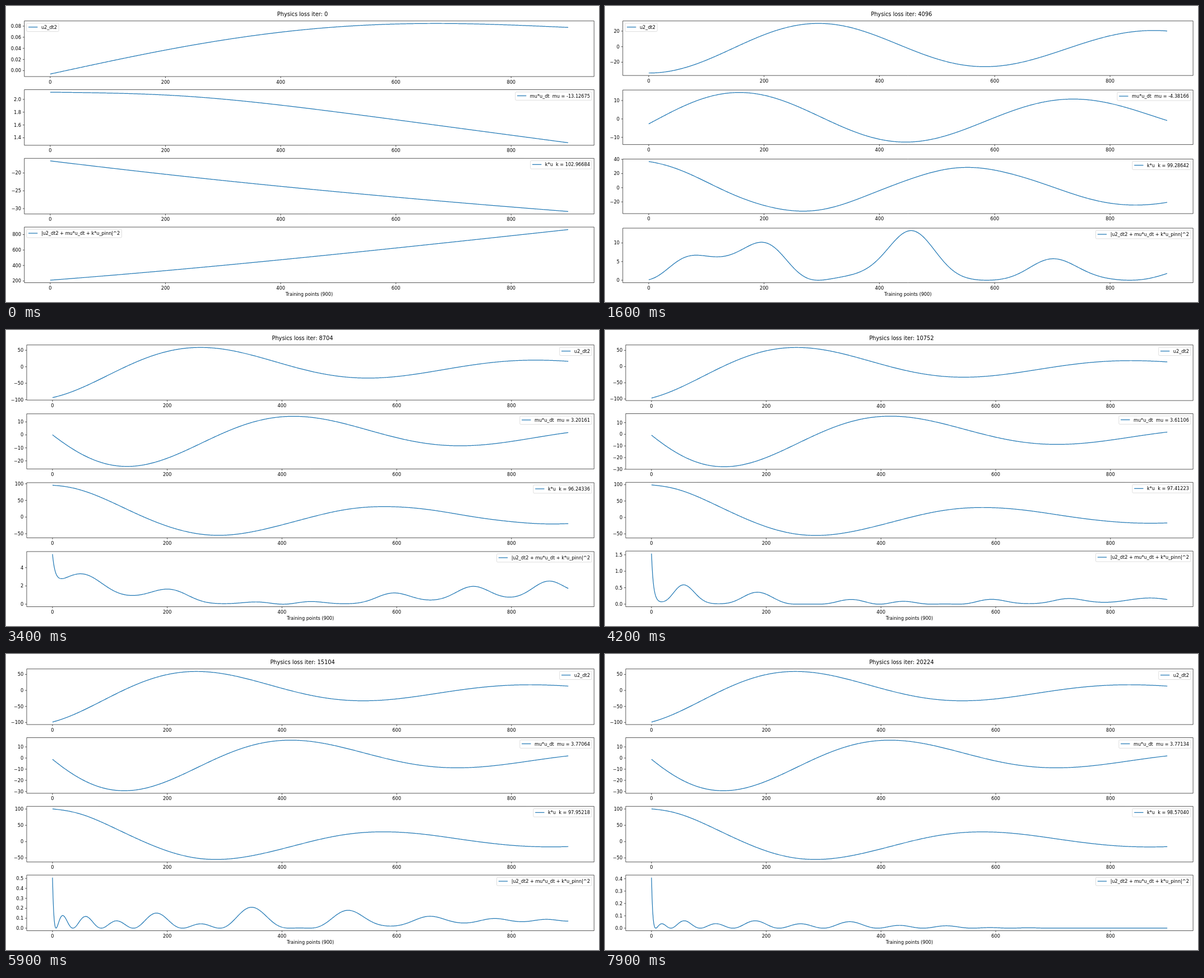
Animation of 1058x529 px, one loop 8 s. Source, as an HTML page with a canvas:

```html
<!DOCTYPE html>
<html lang="en">
<head>
<meta charset="utf-8">
<title>Physics loss</title>
<style>
html, body { margin: 0; width: 100%; height: 100%; overflow: hidden; background: #fff; }
canvas { display: block; }
</style>
</head>
<body>
<canvas id="stage" width="1058" height="529"></canvas>
<script>
const ctx = document.getElementById('stage').getContext('2d');
const { PI, sin, cos, exp, max, min, floor } = Math;
const N = 900, STEPS = 80, STEP_MS = 100, ITERS = 256;
const PT = 1058 / 18 / 72, EM = 10 * PT;
const TOP = 26.7, BOTTOM = 494.5, RIGHT = 1049.2, PAD = 1.08 * EM, GAP = 23.4;
const FACE = 'px "DejaVu Sans", sans-serif';

// Natural cubic spline through evenly spaced values, t from 0 to 1
function spline(...v) {
  const n = v.length - 1, c = [0], z = [0], m = Array(n + 1).fill(0);
  for (let i = 1; i < n; i++) {
    c[i] = 1 / (4 - c[i - 1]);
    z[i] = (6 * (v[i + 1] - 2 * v[i] + v[i - 1]) - z[i - 1]) * c[i];
  }
  for (let i = n - 1; i > 0; i--) m[i] = z[i] - c[i] * m[i + 1];
  return t => {
    const i = min(floor(t * n), n - 1), s = t * n - i, r = 1 - s;
    return r * v[i] + s * v[i + 1] + ((r ** 3 - r) * m[i] + (s ** 3 - s) * m[i + 1]) / 6;
  };
}

// Damped wave of frequency w with an extremum of height a at t0
const damped = (t0, a, w, d) => t => {
  const s = t - t0;
  return a * exp(-d * s) * (cos(w * s) + d / w * sin(w * s));
};

// Slowing wave left over once the fit has settled, with a spike at the start
const ripple = (size, spike) => t => {
  const phase = (50 * t) ** .6 + 4.5 * t ** 4;
  return size * (.04 + .32 * cos(PI * phase)) / (1 + (t / .6) ** 6) + spike * exp(-300 * t);
};

function earlyRes(t) {
  const y = t - .022;
  const slow = 2.9 * sin(PI * y * (2.79 + .627 * y));
  return (slow + cos(2 * PI * (t - .0556) / .1833)) * (1 - t ** 2.5);
}

function midRes(t) {
  const cycles = (t - .059) * 5.73 + .4 * t ** 4;
  return 1.6 * exp(-.5 * t) * cos(3.55 * t) + .3 * cos(2 * PI * cycles)
    + .9 * exp(-150 * t) - .5 * t ** 10;
}

function driftRes(t) {
  const dip = -.5 * 60 * t * exp(1 - 60 * t);
  return ripple(1, -.16)(t) + dip + 1.75 * (1 - exp(-((t / .48) ** 2.5)));
}

const settledAcc = damped(.279, 59.2, 9.71, 1.87);
const settledVel = damped(.139, -29.3, 9.73, 1.87);
const sample = f => Array.from({ length: N }, (_, i) => f(i / (N - 1)));

// ease shapes the way into a state: 1 is linear, above 1 slows down at the end
const key = (step, ease, mu, k, acc, vel, res) => ({
  step, ease, mu, k, acc: sample(acc), slope: sample(t => vel(t) / mu), res: sample(res)
});
const keys = [
  key(0, 1, -13.12675, 102.96684,
    spline(-.0062, .0417, .0745, .0848, .0777),
    spline(2.113, 2.056, 1.857, 1.592, 1.322),
    t => -14.5 - 17.5 * t + 2.6 * t * t),
  key(9, 2, -9.26824, 102.56766,
    spline(-2.95, -1.65, 2.3, 3.97, -.4, -3.37, -2.05, -.47, .36),
    spline(.13, 3.1, 2.93, -1.02, -3.77, -1.2, 2.03, 3.73, 3.74),
    spline(1.65, 3.44, 2.28, -1.4, -4.15, -1.05, 2.8, 1.7, -2.7)),
  key(23, 1, .50491, 96.00517,
    damped(.3256, 55.8, 9.71, .46), damped(.1744, -3.12, 9.8, .465), earlyRes),
  key(34, 1.5, 3.20161, 96.24336,
    damped(.2867, 58.6, 9.67, 1.647), damped(.1444, -24.3, 9.73, 1.645), midRes),
  key(51, 2, 3.77051, 97.86742, settledAcc, settledVel, ripple(1, .45)),
  key(67, .25, 3.77135, 98.40015, settledAcc, settledVel, driftRes),
  key(79, 4, 3.77134, 98.5704, settledAcc, settledVel, ripple(.68, .395))
];

function curves(step) {
  const i = max(1, keys.findIndex(q => step <= q.step));
  const a = keys[i - 1], b = keys[i];
  const w = 1 - (1 - (step - a.step) / (b.step - a.step)) ** b.ease;
  const mix = (p, q) => p + (q - p) * w;
  const blend = name => a[name].map((v, j) => mix(v, b[name][j]));
  const mu = mix(a.mu, b.mu), k = mix(a.k, b.k);
  const acc = blend('acc'), res = blend('res'), vel = blend('slope').map(v => v * mu);
  return [
    ['u2_dt2', acc],
    ['mu*u_dt  mu = ' + mu.toFixed(5), vel],
    ['k*u  k = ' + k.toFixed(5), res.map((r, j) => r - acc[j] - vel[j])],
    ['|u2_dt2 + mu*u_dt + k*u_pinn|^2', res.map(r => r * r)]
  ];
}

function axisTicks(lo, hi, height) {
  const raw = (hi - lo) / max(1, floor(height / (2 * EM)));
  const mag = 10 ** floor(Math.log10(raw));
  const unit = [1, 2, 2.5, 5, 10].find(u => u * mag >= raw * .99999);
  const gap = unit * mag;
  const digits = max(0, -floor(Math.log10(gap) + 1e-9) + (unit === 2.5 ? 1 : 0));
  const list = [];
  for (let i = Math.ceil(lo / gap); i * gap <= hi; i++) {
    const label = Math.abs(i * gap).toFixed(digits);
    list.push({ v: i * gap, label: (i < 0 ? '\u2212' : '') + label });
  }
  return list;
}

function text(s, x, y, align, size = EM) {
  ctx.font = size + FACE;
  ctx.textAlign = align;
  ctx.fillStyle = '#000';
  ctx.fillText(s, x, y);
}

function stroke(points, width, color) {
  ctx.beginPath();
  points.forEach(p => ctx.lineTo(p[0], p[1]));
  ctx.lineWidth = width * PT;
  ctx.strokeStyle = color;
  ctx.stroke();
}

// Takes the corner where the box covers the least of the line
function legend(label, line, left, top, height) {
  ctx.font = EM + FACE;
  const w = ctx.measureText(label).width + 3.6 * EM, h = 14.8, off = EM / 2;
  const x0 = left + off, x1 = RIGHT - off - w;
  const y0 = top + off, y1 = top + height - off - h;
  const hits = ([x, y]) => line.filter(p => p[0] > x && p[0] < x + w && p[1] > y && p[1] < y + h).length;
  const spots = [[x1, y0], [x0, y0], [x0, y1], [x1, y1]];
  const score = spots.map(hits);
  const [x, y] = spots[score.indexOf(min(...score))];
  ctx.beginPath();
  ctx.roundRect(x, y, w, h, .2 * EM);
  ctx.fillStyle = 'rgba(255,255,255,.8)';
  ctx.fill();
  ctx.lineWidth = PT;
  ctx.strokeStyle = 'rgba(204,204,204,.8)';
  ctx.stroke();
  const lx = x + .4 * EM, ly = y + 6.9;
  stroke([[lx, ly], [lx + 2 * EM, ly]], 1.5, '#1f77b4');
  text(label, lx + 2.8 * EM, y + 10, 'left');
}

function draw(step) {
  const plots = curves(step).map(([label, data]) => {
    const lo = min(...data), hi = max(...data), pad = (hi - lo) * .05;
    return { label, data, lo: lo - pad, hi: hi + pad };
  });

  // Tick labels that stick out above a panel push the rows apart
  let gap = GAP, height;
  for (let pass = 0; pass < 2; pass++) {
    height = (BOTTOM - TOP - 3 * gap) / 4;
    let over = 0;
    plots.forEach((p, i) => {
      p.ticks = axisTicks(p.lo, p.hi, height);
      const room = (p.hi - p.ticks[p.ticks.length - 1].v) / (p.hi - p.lo) * height;
      if (i) over = max(over, 3.1 - room);
    });
    if (!pass) gap += over;
  }

  ctx.font = EM + FACE;
  const widest = max(...plots.flatMap(p => p.ticks.map(t => ctx.measureText(t.label).width)));
  const left = PAD + widest + 7 * PT;
  const xOf = i => left + (RIGHT - left) * (i / (N - 1) + .05) / 1.1;

  ctx.fillStyle = '#fff';
  ctx.fillRect(0, 0, 1058, 529);
  ctx.lineJoin = 'round';
  text('Physics loss iter: ' + step * ITERS, 529, 18, 'center', 12 * PT);

  plots.forEach((p, row) => {
    const top = TOP + row * (height + gap), bottom = top + height;
    const yOf = v => bottom - (v - p.lo) / (p.hi - p.lo) * height;
    for (let i = 0; i < N; i += 200) {
      const x = xOf(i);
      stroke([[x, bottom], [x, bottom + 3.5 * PT]], .8, '#000');
      text(String(i), x, bottom + 12.4, 'center');
    }
    for (const t of p.ticks) {
      const y = yOf(t.v);
      stroke([[left - 3.5 * PT, y], [left, y]], .8, '#000');
      text(t.label, left - 7 * PT, y + .365 * EM, 'right');
    }
    const line = p.data.map((v, i) => [xOf(i), yOf(v)]);
    stroke(line, 1.5, '#1f77b4');
    ctx.lineWidth = .8 * PT;
    ctx.strokeStyle = '#000';
    ctx.strokeRect(left, top, RIGHT - left, height);
    legend(p.label, line, left, top, height);
  });
  text('Training points (900)', (left + RIGHT) / 2, 518.4, 'center');
}

const start = performance.now();
let shown = -1;
function tick() {
  const step = floor((performance.now() - start) / STEP_MS) % STEPS;
  if (step !== shown) draw(shown = step);
  requestAnimationFrame(tick);
}
tick();
</script>
</body>
</html>
```
